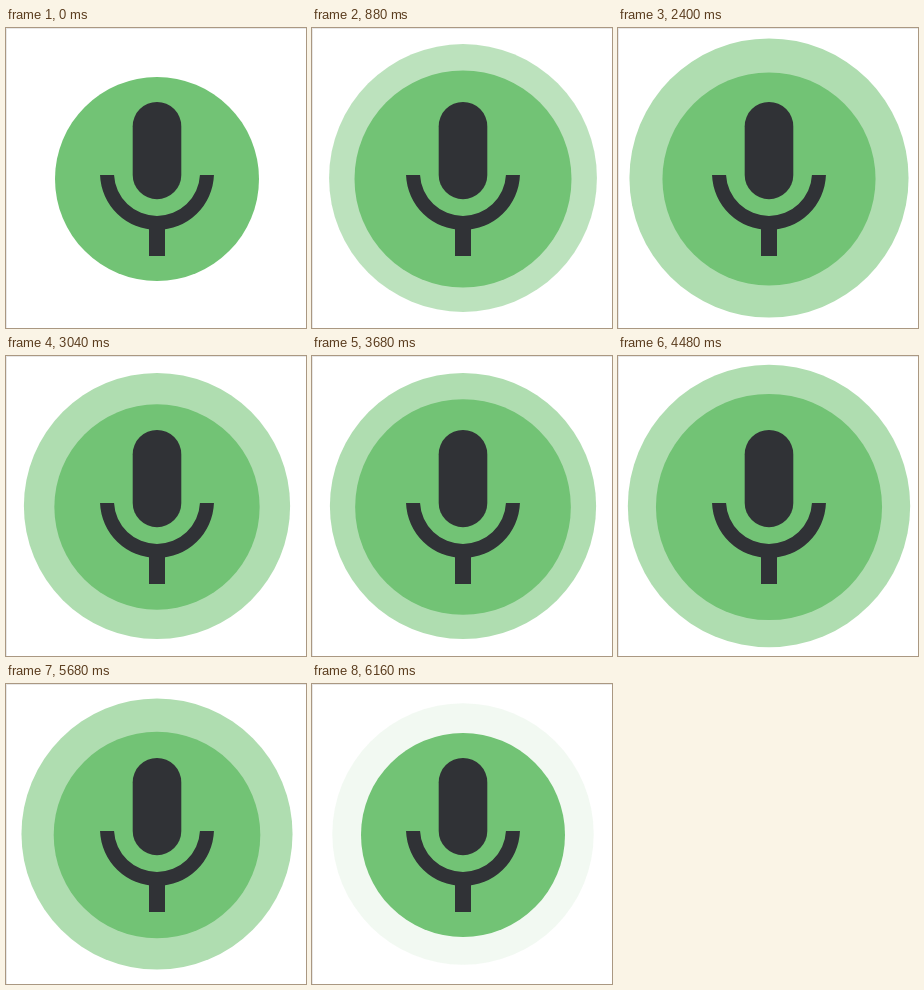
Recreate the animation shown at these times as an HTML page. Size 300 px wide and 300 px high, loop 6400 ms.

```html
<!DOCTYPE html>
<html lang="en">
<head>
<meta charset="utf-8">
<title>Microphone pulse</title>
<style>
  html, body { margin: 0; width: 100%; height: 100%; overflow: hidden; background: #fff; }
  svg { display: block; width: 100%; height: 100%; }
</style>
</head>
<body>
<svg viewBox="0 0 300 300">
  <path d="M0 0H300V1H1V300H0Z" fill="#e8e8e8"/>
  <circle id="halo" cx="151" cy="150" r="130" fill="#afddb0" opacity="0"/>
  <circle id="disc" cx="151" cy="151" r="102" fill="#72c375"/>
  <g fill="#303236">
    <rect x="126.7" y="74" width="48.6" height="97.2" rx="24.3"/>
    <path d="M94.04 147A57 57 0 0 0 207.96 147H193.95A43 43 0 0 1 108.05 147Z"/>
    <rect x="143" y="200" width="16" height="28"/>
  </g>
</svg>
<script>
  const LOOP = 6400, STEP = 80, LAST = 6160;
  const HALF = 1440, SPAN = 4 * HALF, FADE = 480;
  const halo = document.getElementById('halo');
  const disc = document.getElementById('disc');

  const clamp = (v, lo, hi) => Math.min(hi, Math.max(lo, v));

  // Two linear swells, 0 -> 1 -> 0 each, resting at 0 outside the span.
  function swell(t) {
    const p = clamp(t, 0, SPAN) % (2 * HALF) / HALF;
    return 1 - Math.abs(1 - p);
  }

  function draw(now) {
    const t = Math.min(LAST, Math.floor(now % LOOP / STEP) * STEP);
    const h = t - 480;
    disc.setAttribute('r', 102 + 11.7 * swell(t - 80));
    halo.setAttribute('r', 129.9 + 14.5 * swell(h));
    halo.setAttribute('opacity', clamp(Math.min(h, SPAN - h) / FADE, 0, 1));
  }

  let start;
  function tick(now) {
    start ??= now;
    draw(now - start);
    requestAnimationFrame(tick);
  }
  draw(0);
  requestAnimationFrame(tick);
</script>
</body>
</html>
```
